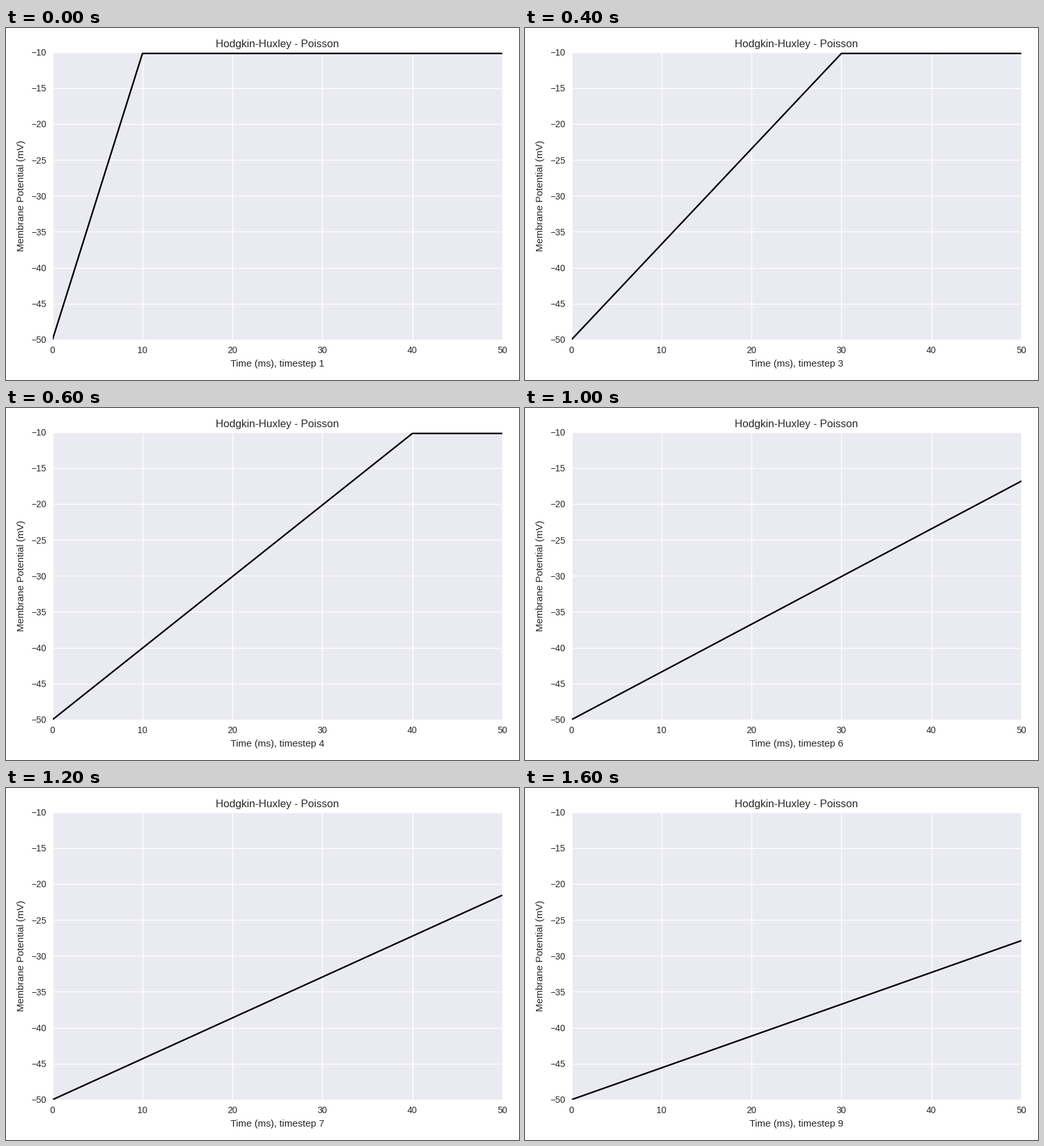
A matplotlib script that plays this animation: 800 by 550 pixels, repeating every 1.8 s.

```python
import matplotlib.pyplot as plt
from matplotlib.animation import FuncAnimation

W, H, DPI = 800, 550, 100
LEFT, RIGHT, TOP, BOTTOM = 72.5, 774, 37.5, 487
STEPS, INTERVAL = 9, 200
X_MAX, REST, PEAK = 50, -50, -10.2
INK = "0.15"

plt.rcParams.update({
    "font.family": "Liberation Sans",
    "text.color": INK,
    "axes.facecolor": "#EAEAF2",
    "axes.edgecolor": "white",
    "axes.axisbelow": True,
    "xtick.color": INK,
    "ytick.color": INK,
})

fig = plt.figure(figsize=(W / DPI, H / DPI), dpi=DPI, facecolor="white")
ax = fig.add_axes([LEFT / W, 1 - BOTTOM / H, (RIGHT - LEFT) / W, (BOTTOM - TOP) / H])
ax.set_xlim(0, X_MAX)
ax.set_ylim(-50, -10)
ax.set_xticks(range(0, 51, 10))
ax.set_yticks(range(-50, -9, 5))
ax.grid(True, color="white", linewidth=1, linestyle="-")
ax.tick_params(length=0, pad=7, labelsize=10)
for spine in ax.spines.values():
    spine.set_linewidth(0)


def label(x, y, text, size, rotation=0):
    """Centred text with its baseline at a pixel position from the top left."""
    return fig.text(x / W, 1 - y / H, text, size=size, rotation=rotation,
                    ha="center", va="baseline", rotation_mode="anchor")


mid_x = (LEFT + RIGHT) / 2
label(mid_x, 30, "Hodgkin-Huxley - Poisson", 12)
label(28, (TOP + BOTTOM) / 2, "Membrane Potential (mV)", 11, rotation=90)
time_label = label(mid_x, 529, "", 11)
line, = ax.plot([], [], color="black", linewidth=1.75,
                solid_capstyle="round", solid_joinstyle="round")


def update(frame):
    step = frame + 1
    ramp_end = 10 * step
    line.set_data([0, ramp_end, max(ramp_end, X_MAX) + 10], [REST, PEAK, PEAK])
    time_label.set_text(f"Time (ms), timestep {step}")
    return line, time_label


anim = FuncAnimation(fig, update, frames=STEPS, interval=INTERVAL,
                     repeat=True, repeat_delay=0, blit=False)
plt.show()
```
